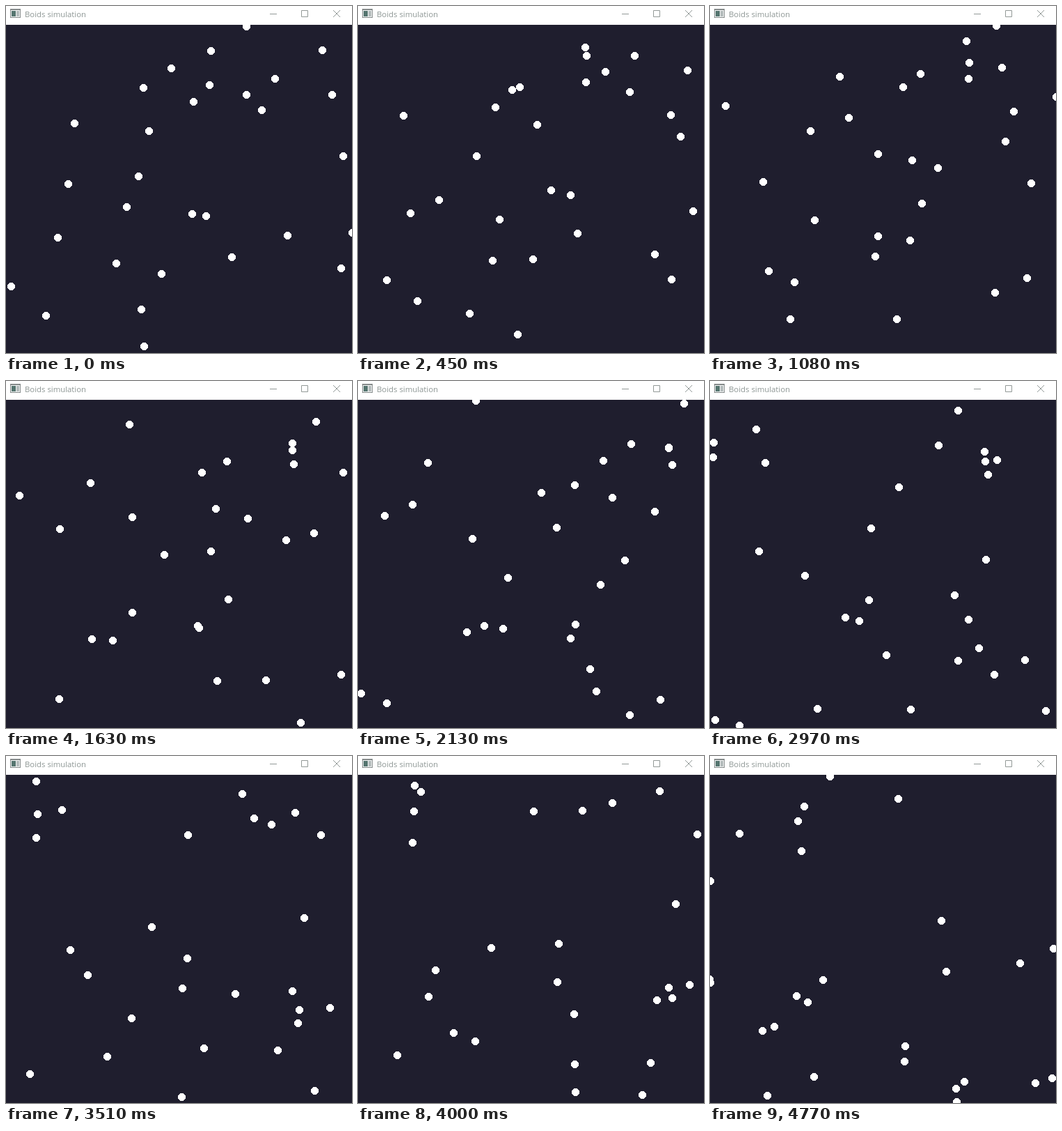
An HTML page with a canvas that plays this animation: 497x498 px, repeating every 4.79 s.

```html
<!DOCTYPE html>
<html lang="en">
<head>
<meta charset="utf-8">
<title>Boids simulation</title>
<style>
  html, body { margin: 0; width: 100%; height: 100%; overflow: hidden; background: #1f1e2e; }
  canvas { display: block; }
</style>
</head>
<body>
<canvas id="stage" width="497" height="498"></canvas>
<script>
const ctx = document.getElementById('stage').getContext('2d');
const LOOP = 4790, FIRST_TICK = 20, TICK = 69.8;
const SPEED = 5, WORLD = 500, LEFT = -1, TOP = 27, RADIUS = 5.5;

// Each boid flies straight: start x, start y, heading in degrees
const boids = [
  [345, 29, 122.1], [294, 64, 12], [237, 89, 118], [197, 117, -1], [269, 137, 110.4],
  [292, 113, -6.8], [345, 127, -73.1], [367, 149, -49.2], [386, 104, -72], [454, 63, 57.3],
  [468, 127, 123.1], [484, 215, -126.5], [98, 168, -161.9], [205, 179, -103.6], [190, 244, -125.3],
  [89, 255, 40.1], [173, 288, 31.6], [267, 298, -73.5], [287, 301, -59.8], [74, 332, -88.7],
  [158, 369, -7.3], [223, 384, -36.5], [324, 360, -104.4], [404, 329, 50], [481, 376, 153.7],
  [497, 325, -117.1], [7, 402, -15.6], [57, 444, -37.1], [194, 435, 169.9], [198, 488, -29.1]
];

const wrap = (v, min) => ((v - min) % WORLD + WORLD) % WORLD + min;

function rect(color, x, y, w, h) {
  ctx.fillStyle = color;
  ctx.fillRect(x, y, w, h);
}

// Hard-edged disc centred on one pixel
function disc(cx, cy) {
  const reach = Math.floor(RADIUS);
  for (let dy = -reach; dy <= reach; dy++) {
    const half = Math.floor(Math.sqrt(RADIUS * RADIUS - dy * dy));
    rect('#fff', cx - half, cy + dy, 2 * half + 1, 1);
  }
}

function drawBoids(step) {
  for (const [x, y, heading] of boids) {
    const angle = heading * Math.PI / 180, travelled = SPEED * step;
    disc(Math.round(wrap(x + travelled * Math.cos(angle), LEFT)),
         Math.round(wrap(y + travelled * Math.sin(angle), TOP)));
  }
}

function drawTitleBar() {
  rect('#fff', 0, 0, 497, TOP);
  rect('#858a8a', 6, 4, 15, 13);
  rect('#f4f6f6', 7, 6, 13, 10);
  rect('#55756f', 8, 7, 6, 8);
  rect('#b4bcbc', 15, 7, 4, 8);

  ctx.fillStyle = '#8e9795';
  ctx.font = '11.35px "Open Sans", "Noto Sans", sans-serif';
  ctx.fillText('Boids simulation', 27, 16);

  ctx.strokeStyle = '#929997';
  ctx.beginPath();
  ctx.moveTo(379, 11.5);
  ctx.lineTo(389, 11.5);
  ctx.rect(424.5, 6.5, 9, 9);
  ctx.moveTo(470, 6);
  ctx.lineTo(480, 16);
  ctx.moveTo(480, 6);
  ctx.lineTo(470, 16);
  ctx.stroke();
}

function draw() {
  const time = performance.now() % LOOP;
  rect('#1f1e2e', 0, 0, 497, 498);
  drawBoids(Math.floor((time - FIRST_TICK) / TICK) + 1);
  drawTitleBar();
  requestAnimationFrame(draw);
}
draw();
</script>
</body>
</html>
```
